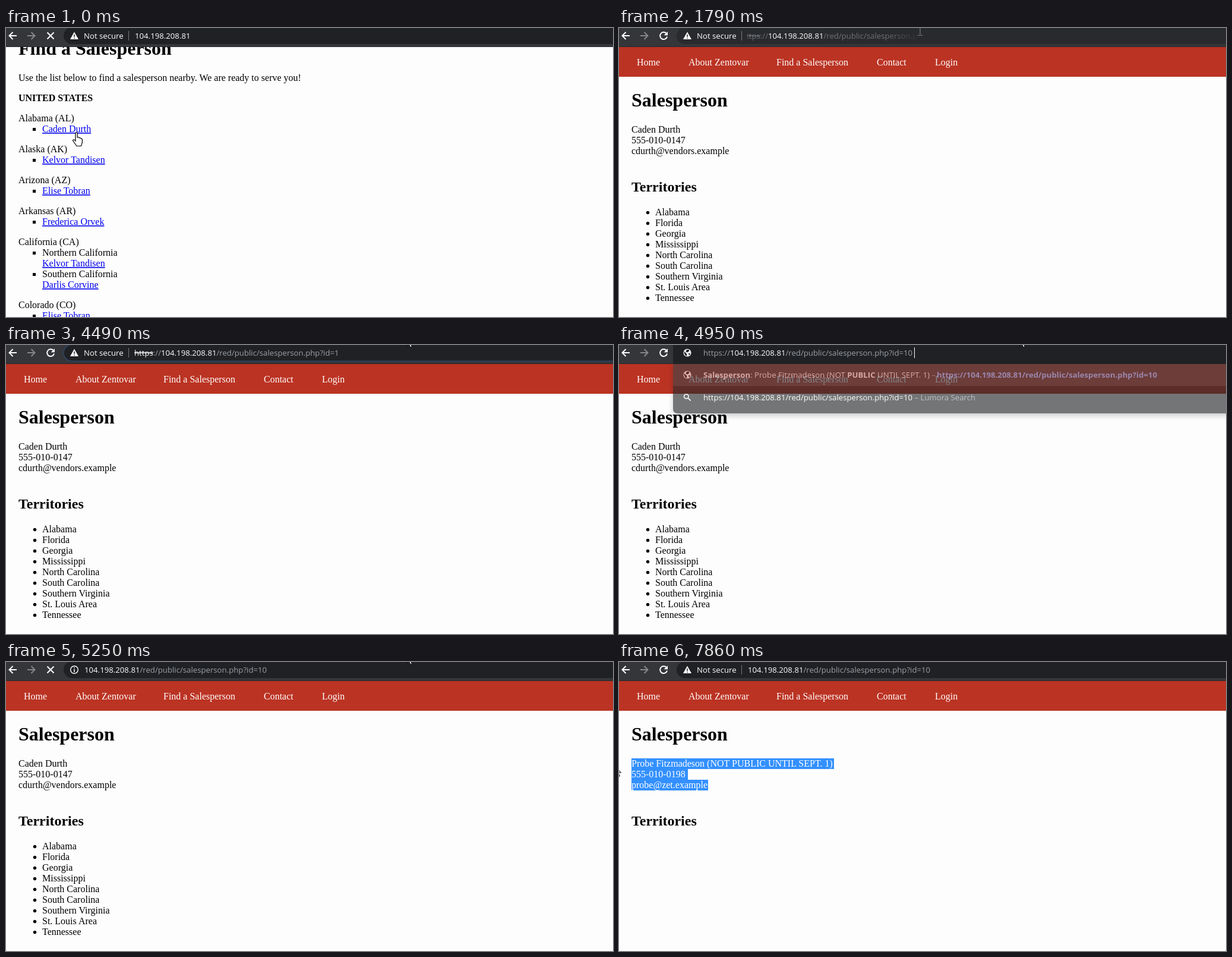
An HTML page for the animation above (8000 ms loop, 1022 by 486 pixels).

```html
<!DOCTYPE html>
<html lang="en">
<head>
<meta charset="utf-8">
<title>Salesperson lookup</title>
<style>
  html, body { margin: 0; width: 100%; height: 100%; overflow: hidden; background: #fdfdfd; }
  svg { display: block; width: 1022px; height: 486px; }
  text { white-space: pre; font: 16px "Liberation Serif", serif; }
  .h1 { font-size: 32px; font-weight: bold; }
  .h2 { font-size: 24px; font-weight: bold; }
  .b { font-weight: bold; }
  .link { fill: #00e; text-decoration: underline; }
  .ui { font: 13.2px "Open Sans", sans-serif; fill: #9aa0a6; }
  .lit { fill: #fff; }
  .strike { text-decoration: line-through; }
  .line { fill: none; stroke: #fff; stroke-width: 2; }
  .popup { filter: drop-shadow(0 4px 5px rgba(0, 0, 0, .3)); }
</style>
</head>
<body>
<svg id="stage" viewBox="0 0 1022 486"></svg>
<script>
const LOOP = 8000;
const HOST = '104.198.208.81';
const PAGE_PATH = '/red/public/salesperson.php?id=';
const HIDDEN_NAME = 'Probe Fitzmadeson';
const stage = document.getElementById('stage');

const text = (x, y, body, cls = '', attrs = '') =>
  `<text x="${x}" y="${y}" class="${cls}" ${attrs}>${body}</text>`;
const span = (cls, body) => `<tspan class="${cls}">${body}</tspan>`;
const rect = (x, y, w, h, fill, attrs = '') =>
  `<rect x="${x}" y="${y}" width="${w}" height="${h}" fill="${fill}" ${attrs}/>`;

// Latest entry [time, ...values] that has started at t.
const at = (keys, t) => keys.filter(k => k[0] <= t).pop().slice(1);

const pointerKeys = [
  [0, 'hand', 112, 175], [460, 'arrow', 230, 182], [580, 'arrow', 330, 182],
  [1130, 'arrow', 400, 140], [1250, 'arrow', 470, 80], [1370, 'arrow', 530, 26],
  [1520, 'beam', 519, 10], [1640, 'beam', 507, 5], [2440, 'arrow', 674, -15],
  [6040, 'arrow', 640, 22], [6160, 'arrow', 556, 92], [6280, 'arrow', 460, 156],
  [6590, 'arrow', 402, 190], [6740, 'arrow', 375, 212], [6990, 'arrow', 343, 214],
  [7110, 'beam', 100, 196], [7260, 'beam', 64, 196], [7410, 'beam', 59, 196],
  [7560, 'arrow', -1, 175], [7710, 'arrow', -7, 175], [7860, 'arrow', -8, 174]
];

const pointerShapes = {
  arrow: '<path d="M.5 .5V16.5L4.3 13 7 19 9.3 18 6.7 12H11.5z" fill="#fff" stroke="#000"/>',
  hand: `<path d="M5 13V2.2a1.6 1.6 0 0 1 3.2 0V9q3-1 3.4 1 2.5-.7 2.8 1.2 2-.2 2 1.6v4.7l-2 6H7
    L.7 14.5q0-2.6 2.6-1.3L5 15z" fill="#fff" stroke="#000" stroke-width="1.2"/>`,
  beam: '<path d="M-4-7.5h3l1 1 1-1h3M-4 7.5h3l1-1 1 1h3M0-6.5v13" fill="none" stroke="#888"/>'
};

// Host x, visible path end and path opacity while the address folds and unfolds.
const addressKeys = [
  [0, 217, 0, 0], [460, 217, 600, 1], [980, 217, 510, .7], [1130, 217, 440, .45],
  [1250, 217, 380, .2], [1370, 217, 0, 0], [1640, 232, 400, .3], [1790, 252, 508, .6],
  [1940, 262, 700, 1], [5520, 217, 700, 1]
];

const icons = {
  reload: '<path class="line" d="M79.6 9A6 6 0 1 0 81 14.5"/><path d="M82 6v6.3h-6.3z" fill="#fff"/>',
  stop: '<path class="line" stroke-width="1.8" d="M69.5 7.5l11 11m0-11l-11 11"/>',
  warning: '<path d="M115 6.5l7 12.5h-14z" fill="#fff"/><path d="M115 11v4m0 1.2v1.5" stroke="#202124" stroke-width="1.5"/>',
  info: '<circle cx="115" cy="13" r="6.3" class="line" style="stroke-width:1.4"/><path d="M115 9v1.6m0 1.4v5" stroke="#fff" stroke-width="1.5"/>',
  globe: `<circle cx="115" cy="13" r="6.6" fill="#e8eaed"/>
    <path d="M110 11l4 4v3.5q-4-1-4.5-7.5zM114 8h4v2l-2 2h-3v-2zM117 14h2l1 2-2 1z" fill="#202124"/>`,
  search: '<path class="line" style="stroke-width:1.6" d="M116.6 89.6l4 4M117 86.5a3.7 3.7 0 1 1-7.4 0a3.7 3.7 0 1 1 7.4 0"/>'
};

function listPage() {
  const square = y => rect(45, y - 7, 5, 5, '#000');
  const person = (y, name) => text(61, y, name, 'link');
  const states = [['Alabama (AL)', 'Caden Durth'], ['Alaska (AK)', 'Kelvor Tandisen'],
    ['Arizona (AZ)', 'Elise Tobran'], ['Arkansas (AR)', 'Frederica Orvek']];
  return text(21, 45, 'Find a Salesperson', 'h1')
    + text(21, 89, 'Use the list below to find a salesperson nearby. We are ready to serve you!')
    + text(21, 123, 'UNITED STATES', 'b')
    + states.map(([state, name], i) => {
      const y = 157 + 52 * i;
      return text(21, y, state) + square(y + 18) + person(y + 18, name);
    }).join('')
    + text(21, 365, 'California (CA)')
    + square(383) + text(61, 383, 'Northern California') + person(401, 'Kelvor Tandisen')
    + square(419) + text(61, 419, 'Southern California') + person(437, 'Darlis Corvine')
    + text(21, 471, 'Colorado (CO)') + square(489) + person(489, 'Elise Tobran');
}

// Selection boxes [x, y, right edge], each one line high.
function selection(t) {
  if (t < 7110) return [];
  const email = [21, 198, 150];
  if (t < 7560) return [[t < 7260 ? 98 : 60, 180, 116], email];
  return [[21, 162, 362], [21, 180, 116], email];
}

function personPage(t) {
  const hidden = t >= 5520;
  const nav = [[30, 'Home'], [117, 'About Zentovar'], [265, 'Find a Salesperson'], [434, 'Contact'], [532, 'Login']];
  const details = hidden
    ? [HIDDEN_NAME + ' (NOT PUBLIC UNTIL SEPT. 1)', '555-010-0198', 'probe@zet.example']
    : ['Caden Durth', '555-010-0147', 'cdurth@vendors.example'];
  const territories = hidden ? [] : ['Alabama', 'Florida', 'Georgia', 'Mississippi', 'North Carolina',
    'South Carolina', 'Southern Virginia', 'St. Louis Area', 'Tennessee'];
  const lines = cls => details.map((d, i) => text(21, 176 + 18 * i, d, cls)).join('');
  const boxes = fill => selection(t).map(([x, y, right]) => rect(x, y, right - x, 18, fill)).join('');
  return rect(0, 32, 1022, 50, '#bb3323')
    + nav.map(([x, label]) => text(x, 63, label, 'lit')).join('')
    + text(21, 132, 'Salesperson', 'h1') + lines('')
    + `<clipPath id="selected">${boxes('#000')}</clipPath>${boxes('#3390ff')}`
    + `<g clip-path="url(#selected)">${lines('lit')}</g>`
    + text(21, 275, 'Territories', 'h2')
    + territories.map((name, i) =>
      `<circle cx="48.5" cy="${310.5 + 18 * i}" r="2.7"/>` + text(61, 315 + 18 * i, name)).join('');
}

function address(t) {
  const popup = t >= 4950 && t < 5250;
  if (popup) {
    return icons.globe + text(142, 18, 'https://' + span('lit', HOST) + PAGE_PATH + '10', 'ui')
      + rect(497, 4, 1, 18, '#fff');
  }
  if (t >= 5250 && t < 5520) return icons.info + text(132, 18, span('lit', HOST) + PAGE_PATH + '10', 'ui');

  const [hostX, end, opacity] = at(addressKeys, t);
  const selected = t >= 1940 && t < 2440 + 400;
  const caret = (t >= 2840 && t < 3380) || (t >= 3930 && t < 4490);
  const path = PAGE_PATH + (t >= 5520 ? '10' : '1');
  const pathFill = selected ? '#fff' : 'url(#fade)';
  const scheme = hostX > 217
    ? `<tspan fill-opacity="${opacity}">${span(opacity < 1 ? 'strike' : 'strike lit', 'https')}://</tspan>` : '';
  return icons.warning + text(131, 18, 'Not secure', 'ui lit') + rect(206, 5, 1, 16, '#77797d')
    + `<linearGradient id="fade" gradientUnits="userSpaceOnUse" x1="${end - 60}" x2="${end}">
      <stop stop-color="#9aa0a6" stop-opacity="${opacity}"/><stop offset="1" stop-color="#9aa0a6" stop-opacity="0"/></linearGradient>
      <clipPath id="field">${rect(216, 0, 806, 28, '#000')}</clipPath>`
    + (selected ? rect(216, 2, 347, 22, '#185abc') : '')
    + '<g clip-path="url(#field)">'
    + text(scheme ? hostX - 46 : hostX, 18,
      scheme + span('lit', HOST) + (opacity ? `<tspan style="fill:${pathFill}">${path}</tspan>` : ''),
      'ui' + (selected ? ' lit' : ''))
    + '</g>' + (caret ? rect(563, 3, 1, 18, '#fff') : '');
}

function toolbar(t) {
  const popup = t >= 4950 && t < 5250;
  const focused = t >= 1940 && t < 4950;
  const hovered = t >= 1520 && t < 1940;
  const loading = t < 580 || (t >= 5250 && t < 5640);
  const field = popup ? rect(91, 0, 940, 32, '#202124')
    : rect(97, -1, 960, 28, hovered ? '#292a2d' : '#202124',
      `rx="14" ${focused ? 'stroke="#2d4468" stroke-width="1.5"' : ''}`);
  return rect(0, 0, 1022, 32, '#35363a') + rect(0, 31, 1022, 1, '#28292c') + field
    + '<path class="line" d="M18 13H5.5m6-6l-6 6 6 6"/>'
    + '<path class="line" style="stroke:#85868a" d="M36 13h12.5m-6-6l6 6-6 6"/>'
    + (loading ? icons.stop : icons.reload) + address(t);
}

function suggestions(t) {
  if (t < 4950 || t >= 5250) return '';
  const url = 'https://' + HOST + PAGE_PATH + '10';
  return `<g class="popup" opacity="${t < 5100 ? .645 : 1}">
    <path d="M91 31H1040V115H99q-8 0-8-8z" fill="#292a2d"/>${rect(91, 31, 940, 38, '#424347')}
    <g transform="translate(0 37)">${icons.globe}</g>${icons.search}`
    + text(142, 55, `${span('b', 'Salesperson')}: ${HIDDEN_NAME} (NOT ${span('b', 'PUBLIC')} UNTIL SEPT. 1)`, 'ui', 'style="fill:#e8eaed"')
    + text(526, 55, '–', 'ui') + text(535, 55, url, 'ui b', 'style="fill:#8ab4f8;font-weight:bold"')
    + text(142, 93, span('lit', url) + ' – Lumora Search', 'ui') + '</g>';
}

function pointer(t) {
  const [shape, x, y] = at(pointerKeys, t);
  return `<g transform="translate(${x} ${y})">${pointerShapes[shape]}</g>`;
}

let shown = '';
function draw(now) {
  const t = now % LOOP;
  const scene = rect(0, 0, 1022, 486, '#fdfdfd') + (t < 460 ? listPage() : personPage(t))
    + suggestions(t) + toolbar(t) + pointer(t);
  if (scene !== shown) stage.innerHTML = shown = scene;
  requestAnimationFrame(draw);
}
draw(performance.now());
</script>
</body>
</html>
```
